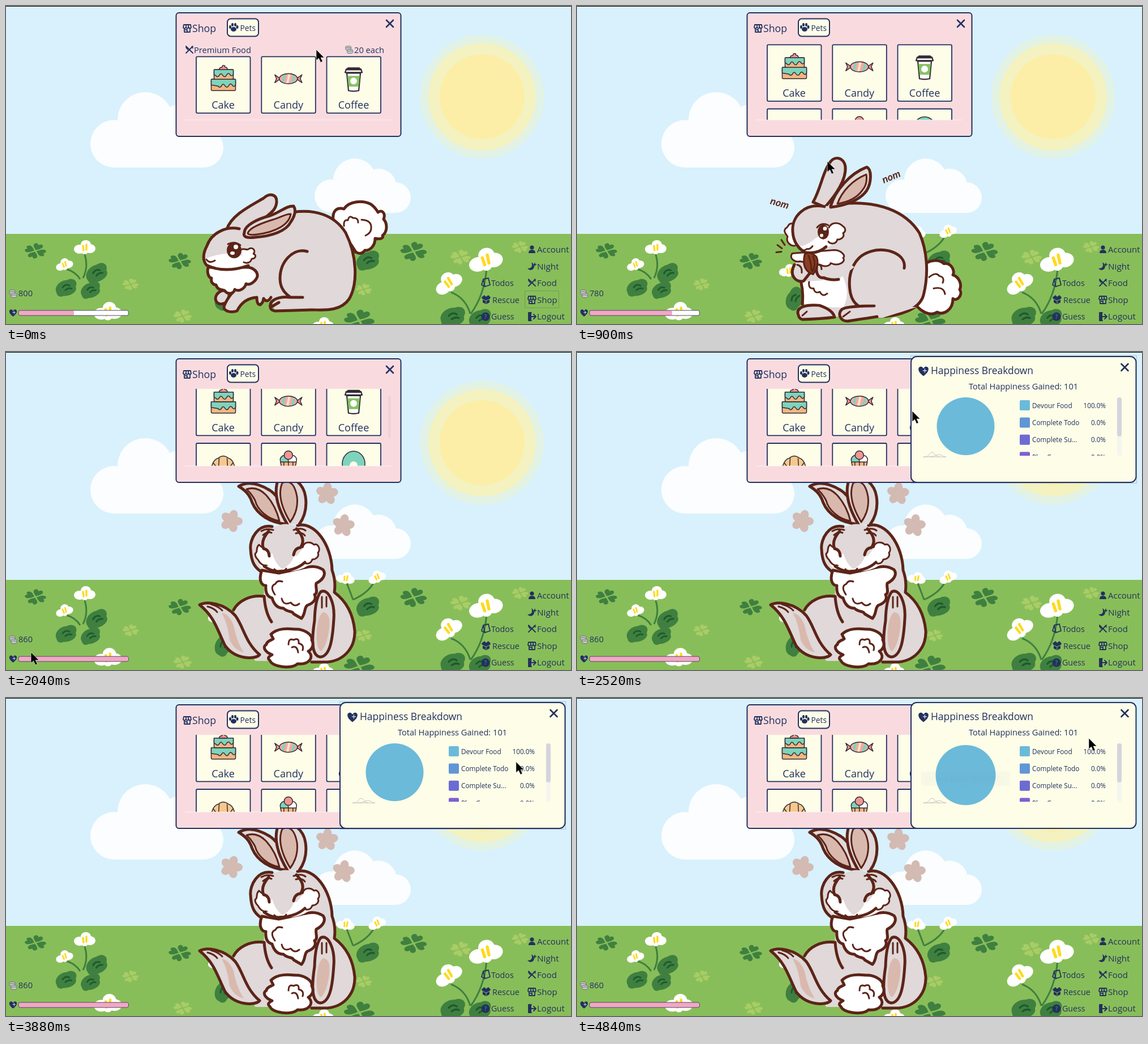
Recreate the animation shown at these times as an HTML page. Size 998 by 561 pixels, loop 4900 ms.

```html
<!DOCTYPE html>
<html lang="en">
<head>
<meta charset="utf-8">
<title>Pet shop</title>
<style>
html,body{margin:0;width:100%;height:100%;overflow:hidden;background:#d7f0fd}
svg{display:block;width:998px;height:561px}
text{font-family:"Open Sans","Noto Sans",sans-serif;fill:#22305f}
.b,.w,.p,.l{stroke:#5c2418;stroke-width:5;stroke-linejoin:round;stroke-linecap:round}
.b{fill:#e0d8d9}.w{fill:#fff}.p{fill:#d9b9ae}.l{fill:none}
.s{stroke-width:3}.n{stroke:none}
.i{fill:none;stroke:#22305f;stroke-width:1.8;stroke-linecap:round;stroke-linejoin:round}
.f{fill:#22305f}
.o{stroke:#332a33;stroke-width:1.5;stroke-linejoin:round;stroke-linecap:round}
.stem{fill:none;stroke:#3f8040;stroke-width:3}
.card{fill:#fdfde8;stroke:#22305f;stroke-width:1.8}
</style>
</head>
<body>
<svg id="stage" viewBox="0 0 998 561" xmlns="http://www.w3.org/2000/svg"></svg>
<script>
const LOOP = 4900;
const path = (c, d) => `<path class="${c}" d="${d}"/>`;
const dot = (x, y, r, fill, ry = r) => `<ellipse cx="${x}" cy="${y}" rx="${r}" ry="${ry}" fill="${fill}"/>`;
const box = (x, y, w, h, fill, r = 0, more = '') => `<rect x="${x}" y="${y}" width="${w}" height="${h}" rx="${r}" fill="${fill}" ${more}/>`;
const at = (x, y, body, s = 1, rot = 0) => `<g transform="translate(${x} ${y}) rotate(${rot}) scale(${s})">${body}</g>`;
const label = (x, y, size, s, more = '') => `<text x="${x}" y="${y}" font-size="${size}" ${more}>${s}</text>`;
const group = (id, body) => `<g id="${id}">${body}</g>`;

/* Scenery */
const heart = 'M0-2C-3-5-9-9-8-14C-6-19-2-18 0-14C2-18 6-19 8-14C9-9 3-5 0-2Z';
const clover = (x, y, s, fill) => `<g transform="translate(${x} ${y}) scale(${s} ${s * .72})" fill="${fill}">` +
  [22, 112, 202, 292].map(a => `<path transform="rotate(${a})" d="${heart}"/>`).join('') + '</g>';
const leaf = (x, y, s, rot) => at(x, y,
  `<path d="M-20 6C-24-5-10-16 3-14C16-18 24-8 17 1C20 12 2 17-8 14C-16 16-20 12-20 6Z" fill="#3f8040"/>
   <path d="M-7-2Q0-8 6-3M-3 4Q3 0 9 3" fill="none" stroke="#1d5a2b" stroke-width="3" stroke-linecap="round"/>`, s, rot);
const flower = (x, y, s, rot = 0) => at(x, y,
  dot(-9, 3, 10, '#fff', 8) + dot(9, 2, 10, '#fff', 8) + dot(2, -5, 9, '#fff', 8) + dot(0, 6, 6, '#fff', 6) +
  '<path d="M-3-3L-2 5M3-5V4" stroke="#ffd91f" stroke-width="3.4" stroke-linecap="round"/>', s, rot);

const dark = '#3f8040', pale = '#a9cc66';
const scene = `
<defs>
 <clipPath id="shelf"><rect x="316" y="65" width="370" height="136"/></clipPath>
 <clipPath id="rows"><rect x="770" y="78" width="180" height="105"/></clipPath>
</defs>` +
box(0, 0, 998, 561, '#d8f1fc') +
dot(841, 160, 109, '#e2f2e4') + dot(841, 160, 95, '#f3f2c0') + dot(841, 160, 75, '#fceea6') +
`<g fill="#fbfdfe"><circle cx="191" cy="243" r="42"/><circle cx="246" cy="201" r="49"/><circle cx="310" cy="218" r="45"/><circle cx="349" cy="250" r="35"/><rect x="190" y="215" width="160" height="70"/>
<circle cx="574" cy="335" r="29"/><circle cx="616" cy="307" r="38"/><circle cx="658" cy="319" r="32"/><circle cx="688" cy="338" r="27"/><rect x="574" y="320" width="114" height="45"/></g>` +
box(0, 402, 998, 159, '#88be59') +
clover(52, 432, 1.05, dark) + clover(307, 450, 1.1, dark) + clover(720, 433, 1.3, dark) + clover(624, 555, 1.5, dark) +
clover(220, 491, .8, pale) + clover(312, 547, .9, pale) + clover(803, 443, 1, pale) + clover(908, 425, .8, pale) + clover(632, 500, .8, pale) +
path('stem', 'M131 482Q122 468 106 464M136 480Q146 460 139 438M613 437Q606 418 602 408M613 437Q640 425 650 406M820 543Q812 515 786 505M821 543Q845 510 849 463') +
leaf(107, 497, .95, -10) + leaf(161, 471, 1, -20) + leaf(150, 501, .9, -15) + flower(139, 426, 1) + flower(103, 456, .82, -15) + flower(180, 539, 1.3) +
leaf(640, 449, 1.05, -12) + flower(600, 399, .85, 10) + flower(655, 397, .85, -20) +
leaf(385, 516, 1, -50) + flower(374, 467, .9) +
leaf(790, 548, 1.1, -5) + leaf(838, 551, 1, -10) + flower(847, 448, 1.6, -12) + flower(781, 488, 1.35, -30) + flower(560, 562, 1);

/* Rabbit poses */
const lying =
path('w', 'M578 378C576 362 584 354 597 358C606 344 630 342 645 350C650 354 654 358 657 364C664 358 671 366 667 376C674 384 674 398 665 405C668 410 660 412 652 410C652 424 642 432 634 431C630 437 624 438 618 434L596 400Z') +
path('l s', 'M597 388Q596 376 604 378Q606 368 613 374Q622 373 622 382M628 377Q645 378 645 390Q646 400 635 405') +
path('b', 'M390 394C398 369 431 353 455 339C466 329 479 332 478 346C477 358 470 363 463 369C450 381 430 392 410 398Z') +
path('b n', 'M430 395L505 364C545 358 580 368 600 400C620 440 622 490 606 517C590 540 560 536 540 536H475L466 514L400 520L405 470Z') +
path('l', 'M505 364C545 358 580 368 600 400C620 440 622 490 606 517C590 540 560 536 540 536L475 538C464 537 464 524 474 518Q485 512 503 514C495 509 484 500 484 481C484 451 507 426 532 433M503 514H524M470 530L482 523') +
path('b', 'M392 504C380 498 370 508 370 517C372 527 382 528 390 522') +
path('b', 'M414 492C398 505 390 517 385 530C384 540 400 541 408 538C416 522 428 515 443 514Q443 527 449 527Q454 524 455 516Q461 525 468 514') +
path('w', 'M357 461C354 474 360 480 363 480C361 489 368 492 371 492C374 503 384 500 386 502C392 510 402 508 404 500C412 505 422 498 424 490C432 494 442 484 444 477C445 468 436 462 428 461Z') +
path('b n', 'M430 391C395 386 363 400 355 423C348 436 347 448 354 457C375 468 403 467 424 459L450 430Z') +
path('w n', 'M352 446Q385 432 416 440L436 449Q415 462 390 462Q364 464 354 455Z') +
path('l', 'M412 393C389 388 363 400 355 423C348 436 347 448 354 457C375 468 403 467 428 458') +
path('w s', 'M415 430C420 426 426 432 428 429C436 424 442 432 437 437C444 440 440 446 434 446C432 454 424 454 420 452') +
path('l s', 'M354 447Q359 455 369 449') +
dot(403, 431, 13, '#5c2418', 14) + dot(406, 425, 4, '#fff') + dot(400, 436, 4, '#fff', 3) + path('l s', 'M392 420Q404 414 414 422') +
path('b', 'M421 400C421 386 447 375 466 370C483 365 495 352 508 353C513 360 510 371 503 381C495 397 470 406 440 408C425 410 418 407 421 400Z') +
path('p s', 'M427 401C429 391 452 383 471 377C485 373 495 366 503 367C500 386 476 399 443 403Q429 405 427 401Z');

const nom = (x, y, rot) => at(x, y, `<text text-anchor="middle" y="6" font-size="18" font-weight="700" font-style="italic" style="font-family:Lato,sans-serif;fill:#5c2418">nom</text>`, 1, rot);
const eating =
path('w', 'M610 460C620 446 640 446 648 454C662 452 668 468 664 474C676 478 680 492 676 500C682 508 672 522 664 516C664 536 648 546 636 540C624 548 604 540 590 515Z') +
path('l s', 'M622 478Q634 468 640 476Q650 478 646 488M630 498Q648 494 650 508') +
path('b n', 'M440 350H475C530 342 580 360 605 400C618 430 622 470 612 510C605 535 570 548 530 548H420L398 515V420Z') +
path('l', 'M468 348C530 342 580 360 605 400C618 430 622 470 612 510C605 535 570 548 530 548') +
path('w n', 'M392 470C400 500 395 520 405 530L470 532C482 510 476 490 468 474Z') +
path('l', 'M396 488Q400 506 398 526') +
path('l s', 'M410 486Q408 499 418 498Q420 508 429 504Q434 514 442 507') +
path('l', 'M578 462C582 438 548 424 520 432C490 440 478 470 482 500Q484 520 497 529') +
path('b', 'M391 545C386 532 402 526 428 528Q452 536 455 549Q430 552 398 553Q392 551 391 545Z') +
path('b n', 'M480 531H600L540 550H480Z') +
path('b', 'M530 548L478 556C464 556 460 542 468 535Q478 529 525 529') +
path('l s', 'M470 548L482 539M398 546L406 539') +
path('b n', 'M386 452L468 444L490 460L462 482L400 486Z') +
path('w s', 'M380 436C374 446 386 452 394 450L430 456C440 462 448 456 448 453C462 460 476 450 470 444C476 440 466 430 454 430Z') +
path('b', 'M384 456C374 474 386 488 400 485L412 470L402 454') + path('b', 'M424 454C420 474 428 480 436 479Q448 484 462 482') +
path('b', 'M417 345C431 320 434 292 446 276C454 262 471 265 474 282C476 305 457 333 438 354Z') +
path('w s', 'M381 383C372 382 374 390 368 392C364 398 370 402 372 406C368 416 378 424 386 422') +
path('b n', 'M441 352C403 346 379 370 381 397C382 417 392 427 402 434Q425 438 440 424L474 400L490 350Z') +
path('w n', 'M386 422Q400 427 420 410L446 394L462 410Q440 434 405 433Q392 430 386 422Z') +
path('l', 'M437 353C403 346 379 370 381 397C382 417 392 427 402 434Q425 438 440 424') +
path('w s', 'M445 390C450 380 462 380 470 388C476 392 474 398 470 400C474 408 464 412 460 411C458 420 448 420 444 415') +
path('l s', 'M391 426Q398 434 406 428Q412 429 416 423') +
dot(435, 398, 10, '#5c2418', 13) + dot(438, 392, 3.4, '#fff') + dot(432, 404, 3, '#fff') + path('l s', 'M424 390Q432 380 444 386') +
path('b', 'M448 352C456 325 482 294 512 283C521 287 520 311 512 324C501 341 473 352 448 354Z') +
path('p s', 'M460 348C468 325 488 305 511 296C513 309 510 317 504 324C494 338 478 345 460 348Z') +
path('l s" style="fill:#8a3f22', 'M402 438Q412 431 423 442Q429 455 417 473Q396 466 402 438Z') +
path('l s', 'M409 440Q414 453 414 466M417 441Q423 454 416 468M389 456Q398 458 397 470M424 456Q432 455 432 464') +
path('l s', 'M361 412L367 421M354 421L362 427M352 434L361 433') +
nom(358, 347, 16) + nom(555, 300, -22);

const blossom = (x, y, rot) => at(x, y, [0, 72, 144, 216, 288].map(a => `<ellipse transform="rotate(${a})" cy="-11" rx="7.5" ry="9" fill="#d3bab3"/>`).join('') + dot(0, 0, 8, '#d3bab3'), 1, rot);
const happy = blossom(398, 298, 20) + blossom(567, 250, 5) + blossom(596, 306, 10) +
path('b n', 'M470 308C445 303 430 330 432 348C433 372 440 382 458 392L455 432C430 428 410 440 402 455L440 545H560C596 548 617 522 616 492C613 460 599 438 582 425Q583 404 576 385C575 340 545 298 515 306Z') +
path('l', 'M470 308C445 303 430 330 432 348C433 372 440 382 456 391M515 306C545 298 575 340 576 385Q583 404 580 424C599 438 613 460 616 492C617 522 596 548 560 547H540M402 455C410 440 430 428 456 431Q458 460 469 476') +
path('b', 'M497 304C466 301 444 287 435 266C430 250 421 243 411 237C428 227 448 233 466 244C486 257 493 282 497 304Z') +
path('b', 'M497 304C478 272 472 244 482 222C506 214 526 234 529 255C532 275 528 290 518 304') +
path('p s', 'M483 298C462 295 444 278 440 262Q434 250 425 242Q443 236 459 252Q476 270 483 298ZM502 300C487 275 480 250 488 231Q508 222 514 255Q517 280 502 300Z') +
path('w', 'M452 385C446 400 450 412 459 412C458 425 462 432 470 434C474 448 482 452 490 452C498 460 506 456 508 462L522 470C530 460 526 452 532 447C546 442 548 434 545 428C552 426 546 414 548 408C560 402 566 392 560 384C545 374 530 380 520 382L482 390Z') +
path('l s', 'M475 428Q465 413 476 409Q479 402 488 405M487 435Q490 448 503 442Q510 451 518 444') +
path('b n', 'M457 325Q486 290 520 312Q536 338 526 364Q505 389 482 387Q456 380 450 352Z') +
path('w n', 'M447 374Q466 375 470 354Q475 373 488 383Q470 392 450 379ZM486 384Q507 374 509 356Q520 369 543 370Q515 393 486 384Z') +
path('w s', 'M447 340C440 346 446 352 440 356C440 364 446 366 446 368C452 378 460 378 464 374L466 358Z') +
path('w s', 'M524 345C526 334 538 334 544 340C552 336 556 350 551 354C554 362 546 366 541 366C538 376 528 374 524 370') +
path('w n', 'M449 344L470 358L466 378L454 372ZM512 362L525 345L530 370L516 376Z') +
path('l', 'M464 316Q449 333 455 347Q464 348 465 360M508 358Q510 346 520 345Q531 330 513 312M456 378Q470 388 482 387Q512 386 528 371') +
path('l s', 'M474 383Q479 389 484 386Q491 388 495 382M451 316Q461 310 472 314M454 323Q462 316 469 319M508 314Q522 309 529 315M512 320Q523 317 528 324') +
path('b', 'M342 446C355 439 385 443 405 465C420 485 422 512 448 534C440 543 405 543 387 518C373 490 369 468 342 446Z') +
path('p n', 'M381 460Q394 462 402 482Q408 512 420 530Q403 526 395 508Q392 480 381 460Z') + path('l s', 'M356 449Q368 452 373 459M362 445Q376 449 382 456') +
path('b', 'M556 423C570 416 581 444 579 471C577 505 573 537 555 538C539 536 540 506 545 474Q546 435 556 423Z') +
path('p n', 'M560 459Q574 460 571 487Q567 519 556 528Q547 522 549 492Q551 465 560 459Z') + path('l s', 'M558 432V451M566 432V449') +
path('w', 'M468 498C480 486 500 488 510 489C525 488 542 498 540 508C546 518 538 526 534 528C545 538 536 552 515 550C505 560 470 556 466 544C460 540 466 536 470 534C458 530 452 520 460 516C460 510 470 508 472 506Z') +
path('l s', 'M499 516Q499 504 508 508Q518 503 517 514Q527 516 524 526M505 521Q514 517 516 530');

/* Icons */
const store = path('i', 'M1 1H13L14 6Q12 9 10 6Q7 9 5 6Q2 9 0 6ZM2 8V14H12V8M5 1V6M9 1V6M4 10H7V14');
const fork = path('i', 'M1 1L13 13M13 1L1 13M1 3L4 7M11 2L13 4');
const coins = '<g fill="#c9ccca" stroke="#666d72"><ellipse cx="6" cy="3" rx="5.5" ry="2.3"/><ellipse cx="6" cy="6" rx="5.5" ry="2.3"/><ellipse cx="9" cy="9" rx="5.5" ry="2.3"/><ellipse cx="9" cy="12" rx="5.5" ry="2.3"/></g>';
const love = '<path class="f" d="M0 7C-7 2-8-2-7-5C-4-9-1-6 0-4C1-6 4-9 7-5C8-2 7 2 0 7Z"/><path d="M2-4V2M-1-1H5" fill="none" stroke="#dfe6ee"/>';
const paw = `<g class="f"><ellipse cy="3" rx="5" ry="4"/><ellipse cx="-6" cy="-1" rx="2" ry="3"/><ellipse cx="-2" cy="-5" rx="2" ry="3"/><ellipse cx="3" cy="-5" rx="2" ry="3"/><ellipse cx="6.5" cy="-1" rx="2" ry="3"/></g>`;
const cross = '<path d="M-6-6L6 6M6-6L-6 6" stroke="#22305f" stroke-width="2.6" stroke-linecap="round"/>';
const menu =
at(929, 429, '<path class="f" d="M-6 7Q-6 1 0 1Q6 1 6 7Z"/>' + dot(0, -3, 3.6, '#22305f')) + label(938, 435, 15, 'Account') +
at(929, 459, '<path class="f" d="M-1-7Q3 4-8 4Q-2 10 3 4Q6-3-1-7ZM5-7L6-4L9-3L6-2L5 1L4-2L2-3L4-4Z"/>') + label(938, 465, 15.3, 'Night') +
at(922, 481, fork) + label(938, 494, 15, 'Food') + at(922, 511, store) + label(938, 524, 15, 'Shop') +
at(922, 541, path('i', 'M6 0H1V14H6M6 7H14M10 3L14 7L10 11') + box(1, 0, 5, 14, '#22305f')) + label(938, 553, 15.1, 'Logout') +
at(848, 488, path('i', 'M-5-6L4-8L7 4L-2 7ZM-5-6L-8 4L-2 7')) + label(857, 494, 14.3, 'Todos') +
at(848, 518, '<path class="f" d="M-8-4L-3-8L0-5L4-8L8-4L6 0V5L0 8L-6 5V0Z"/><path d="M-7-1L0 2L7-1M0 2V7" stroke="#88be59" fill="none"/>') + label(859, 524, 14.5, 'Rescue') +
dot(847, 548, 7.5, '#22305f') + label(847, 552, 10, '?', 'text-anchor="middle" style="fill:#6c9a62"') + label(857, 553, 14.2, 'Guess') +
box(916.5, 502.5, 60, 30, 'none', 0, 'id="focus" stroke="#5d7a52" stroke-dasharray="1 1"');

/* Shop */
const card = (x, y, icon, name) => `<rect class="card" x="${x}" y="${y}" width="95.5" height="99.5" rx="2"/>` +
  at(x + 47.5, y + 39, icon) + label(x + 47.5, y + 92, 18, name, 'text-anchor="middle"');
const tier = (x, y, w, h) => box(x, y, w, h, '#f3b680', 2, 'class="o"') +
  `<path class="o" fill="#7fd3bd" d="M${x} ${y}h${w}v${h * .5}q-3 5-6 0q-3 -4-6 1q-3 6-7 0q-3-5-6 1q-3 4-6 0L${x} ${y + h * .5}Z"/>`;
const cake = tier(-21, 1, 43, 20) + tier(-16, -16, 34, 17) + '<path class="o" fill="#ef9793" d="M-7-16Q-7-20-2-20Q-2-25 3-23Q2-20 6-20Q9-16 6-16Z"/>';
const candy = '<path class="o" fill="#ef9793" d="M-14 0L-24-7L-21 0L-24 7ZM14 0L24-7L21 0L24 7Z"/><ellipse rx="16" ry="9" fill="#f3a9a2"/><path fill="#7fd3bd" d="M-9-7L-4-9L-8 7L-12 6ZM9-7L13-5L9 7L4 9Z"/><path fill="#fbe3c4" d="M0-9H4L0 9H-4Z"/><ellipse class="o" rx="16" ry="9" fill="none"/>';
const coffee = '<path class="o" fill="#fff" style="stroke-width:2.2" d="M-12-10H12L9 21Q0 23-9 21ZM-13-17H13L15-11H-15ZM-10-19H10L12-16H-12Z"/><path fill="#86c266" d="M-11-5H11L9 14H-9Z"/>' + dot(0, 4, 6, '#fff');
const croissant = '<path class="o" fill="#f6c88c" d="M-22 12Q-20-10-8-13Q0-20 9-13Q20-10 22 12Q12 12 9 2H-9Q-12 12-22 12ZM-7-12L-8 3M7-12L8 3M-17-4L-11 4M17-4L11 4"/>';
const sundae = '<g class="o">' + dot(-7, -10, 7.5, '#7fd3bd') + dot(7, -10, 7.5, '#fff') + dot(0, -18, 7.5, '#ef9793') + '</g><path class="o" fill="#f3b680" d="M-14-6H14L9 18H-9ZM-8-6V4M0-6V4M8-6V4"/>';
const donut = `<g class="o">${dot(0, -3, 20, '#7fd3bd', 22)}</g>` + dot(0, 0, 7, '#fdfde8');
const frame = (x, y, w, h, fill, r) => box(x, y, w, h, fill, r, 'stroke="#22305f" stroke-width="2"');
const shop = frame(300.5, 12, 397, 218, '#f9dbdf', 5) +
at(313, 32, store) + label(329, 46, 17.7, 'Shop') + frame(391, 22.5, 55, 31, '#fdfde8', 6) + at(402, 38, paw) + label(413.5, 44, 13.8, 'Pets') + at(678, 31, cross) +
'<g clip-path="url(#shelf)">' + group('goods',
  at(317, 70, fork) + label(332, 83, 14.7, 'Premium Food') + at(599, 70, coins, .95) + label(615, 83, 14.7, '20 each') +
  card(336, 89.3, cake, 'Cake') + card(451.3, 89.3, candy, 'Candy') + card(566.5, 89.3, coffee, 'Coffee') +
  card(336, 202.5, croissant, 'Croissant') + card(451.3, 202.5, sundae, 'Sundae') + card(566.5, 202.5, donut, 'Donut')) + '</g>' +
box(316, 200.5, 364, 1, '#fff', 0, 'opacity=".6"') + box(675, 78, 5, 74, '#b7969f', 2, 'id="thumb" opacity=".6"');

/* Happiness */
const rows = [['Devour Food', '100.0%', '#6bbad9'], ['Complete Todo', '0.0%', '#6195d6'], ['Complete Su...', '0.0%', '#6c6bd3'], ['Play Game', '0.0%', '#7f5fd3']];
const stats = box(589.5, 6.5, 399, 225, 'none', 0, 'id="ring" stroke="#8b93a0" stroke-dasharray="1 1"') + frame(590, 8, 397.5, 222, '#fdfde8', 10) +
at(612, 34, love, 1.2) + label(625, 39, 17.4, 'Happiness Breakdown') + at(967.5, 27, cross) + label(788.5, 66, 14.6, 'Total Happiness Gained: 101', 'text-anchor="middle"') +
'<path d="M611 185H652M613 185C624 185 622 177 627 177S634 185 640 185M622 185C634 184 635 181 640 181S645 185 652 185" fill="none" stroke="#c3c4c0"/>' +
'<circle id="pie" cx="686.5" cy="131" r="51" fill="#6bbad9"/><g clip-path="url(#rows)">' +
rows.map(([name, value, fill], k) => box(782, 85 + k * 30.4, 18, 18, fill, 2) + label(804, 98.5 + k * 30.4, 11.8, name) + label(934, 98.5 + k * 30.4, 11.7, value, 'text-anchor="end"')).join('') + '</g>' +
box(954, 80, 8, 103, '#f5f5ef', 4) + box(954, 80, 8, 69, '#d5d4dd', 4) +
group('tip', box(608, 102, 157, 25, '#7391d0', 3, 'stroke="#c9d2e6"') + '<path d="M681 127L686 132L691 127" fill="#7391d0"/>' + label(616, 119, 12, 'Devour Food: 100% (125)'));

const bar = at(5, 500, coins) + label(22, 512, 14.6, '800', 'id="money"') + at(12.5, 541.5, love, .9) +
box(22, 537, 194.5, 9, '#fff', 3) + box(22, 537, 98, 9, '#f4a6c4', 3, 'id="joy"') + box(22, 537, 194.5, 9, 'none', 3, 'stroke="#4b4a68"');

const pointers =
group('arrow', '<path transform="scale(1.12)" d="M0 0V17L4 13.5L7 20L10 18.5L7.2 12.5H12.5Z" fill="#000" stroke="#fff" stroke-width=".5"/>') +
group('drag', '<path d="M0 0V13L3 10L5 15L7 14L5 9H9Z" fill="#fff" stroke="#444"/><path d="M2 12H10V18H1V15" fill="none" stroke="#666"/>') +
group('deny', '<circle r="6.5" fill="#fff" stroke="#111" stroke-width="2.4"/><path d="M-4.5-4.5L4.5 4.5" stroke="#111" stroke-width="2.4"/>');

const stage = document.getElementById('stage');
stage.innerHTML = scene + group('lying', lying) + group('eating', eating) + group('happy', happy) +
  bar + menu + shop + group('stats', stats) + group('cursor', pointers) + box(0, 0, 998, 1, '#000');

const el = id => document.getElementById(id);
const set = (id, k, v) => el(id).setAttribute(k, v);
const show = (id, on) => el(id).style.display = on ? '' : 'none';

// Time, x, y
const trail = [[0, 548, 77], [170, 400, 130], [250, 400, 140], [440, 491, 410], [540, 490, 435], [680, 490, 430],
  [1120, 395, 120], [1340, 390, 130], [1460, 391, 177], [1560, 391, 180], [1760, 440, 420], [1840, 440, 420],
  [2080, 14, 538], [2180, 14, 538], [2520, 592, 104], [2740, 592, 104], [3360, 945, 104], [3720, 945, 108], [4280, 725, 131], [4440, 725, 131], [4840, 904, 71]];
// Value at t from [time, value...] steps, eased between them
function tween(steps, t) {
  const k = steps.findIndex(s => s[0] > t);
  if (k < 0) return steps[steps.length - 1].slice(1);
  if (!k) return steps[0].slice(1);
  const a = steps[k - 1], b = steps[k], u = (t - a[0]) / (b[0] - a[0]), e = u * u * (3 - 2 * u);
  return a.slice(1).map((v, n) => v + (b[n + 1] - v) * e);
}

function draw(t) {
  const pose = t < 560 ? 'lying' : t < 1800 ? 'eating' : 'happy';
  for (const p of ['lying', 'eating', 'happy']) show(p, p === pose);
  const breath = Math.sin(Math.PI * t / 880) ** 2;
  set('lying', 'transform', `translate(510 541) scale(${1 - .009 * breath} ${1 + .01 * breath}) translate(-510 -541)`);
  const chew = Math.sin(Math.PI * (t - 1460) / 440) ** 2;
  set('eating', 'transform', `translate(520 556) scale(1 ${1 - .008 * chew}) translate(-520 -556)`);

  el('money').textContent = t < 560 ? 800 : t < 1800 ? 780 : 860;
  set('joy', 'width', tween([[560, 98], [800, 146], [1800, 146], [2060, 194.5]], t)[0]);
  set('goods', 'transform', `translate(0 ${-tween([[260, 0], [340, 21], [1480, 21], [1580, 41.5]], t)[0]})`);
  set('thumb', 'opacity', tween([[260, 0], [300, .6], [700, .6], [900, 0], [1480, 0], [1520, .6], [1900, .6], [2100, 0]], t)[0]);
  show('focus', t < 200);

  show('stats', t >= 2160);
  show('ring', t < 4460);
  const drop = tween([[4560, 0], [4800, 5]], t)[0];
  set('pie', 'r', tween([[2160, 0], [2440, 51], [4200, 51], [4270, 53]], t)[0]);
  set('pie', 'cy', 131 + drop);
  set('tip', 'opacity', tween([[4210, 0], [4280, .55], [4360, .95], [4600, .95], [4840, .04]], t)[0]);
  set('tip', 'transform', `translate(0 ${drop * 5.6})`);

  const [x, y] = tween(trail, t);
  set('cursor', 'transform', `translate(${x} ${y})`);
  const held = t > 250 && t < 560 || t > 1380 && t < 1800;
  const over = y > 330;
  show('arrow', !held);
  show('drag', held && over);
  show('deny', held && !over);
}

const start = performance.now();
function tick(now) {
  draw(Math.max(0, now - start) % LOOP);
  requestAnimationFrame(tick);
}
draw(0);
requestAnimationFrame(tick);
</script>
</body>
</html>
```
